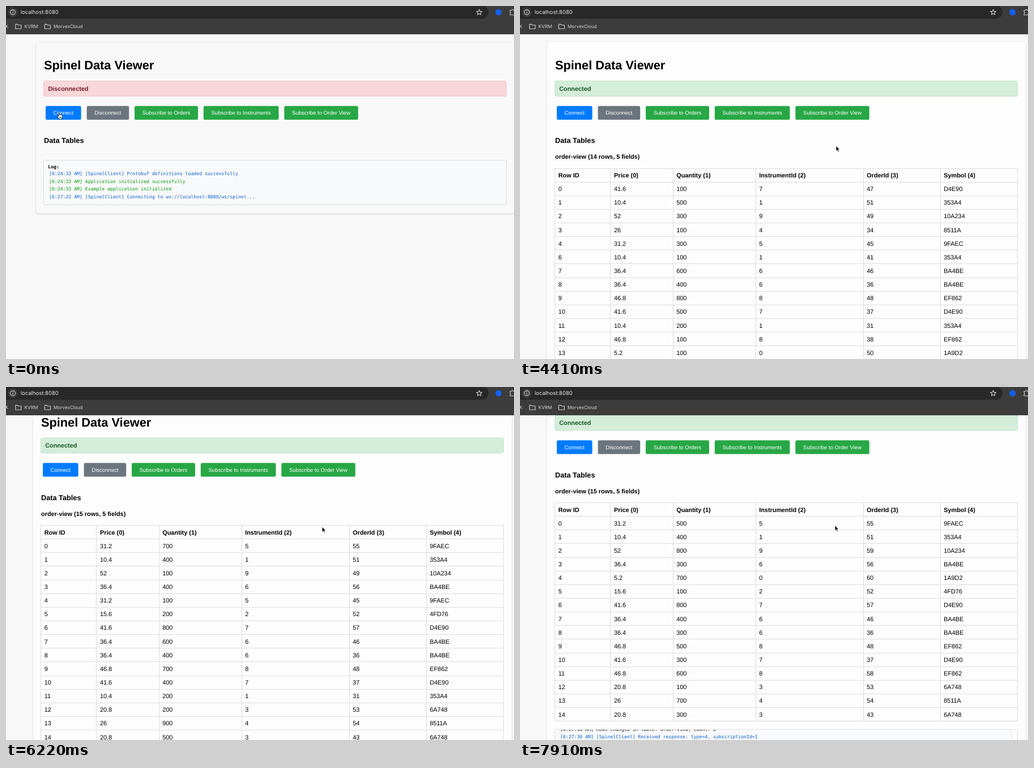
An HTML page for the animation above (8000 ms loop, 897 by 624 pixels).

```html
<!DOCTYPE html>
<html lang="en">
<head>
<meta charset="utf-8">
<title>Spinel Data Viewer</title>
<style>
html, body { margin: 0; width: 100%; height: 100%; overflow: hidden; background: #f8f8f8; }
svg { display: block; }
text { font: 10.88px "Liberation Sans", Arial, sans-serif; text-rendering: geometricPrecision; white-space: pre; }
.h1 { font-size: 21.76px; font-weight: bold; }
.h3 { font-size: 12.73px; font-weight: bold; }
.b { font-weight: bold; }
.btn { font-size: 9.52px; fill: #fff; text-anchor: middle; }
.log, .logb { font: 8.16px "DejaVu Sans Mono", monospace; }
.logb { font-weight: bold; }
.url { font: 9.5px Inter, sans-serif; fill: #e6e6e6; }
.mark { font: 8.16px Inter, sans-serif; fill: #d6d6d6; }
.card { filter: drop-shadow(0 1.2px 1.6px rgba(0, 0, 0, .16)); }
.grid { shape-rendering: crispEdges; fill: none; stroke: #ddd; }
.icon { fill: none; stroke: #d0d0d0; stroke-width: 1.1; stroke-linejoin: round; }
</style>
</head>
<body>
<svg id="stage" width="897" height="624" viewBox="0 0 897 624"></svg>
<script>
const LOOP = 8000;
// bursts of screen updates: first, last, count
const BURSTS = [[0, 0, 1], [180, 1080, 7], [1260, 1560, 3], [1850, 1850, 1], [2330, 2330, 1],
  [2680, 3670, 6], [3820, 4850, 8], [5000, 6040, 8], [6220, 7250, 7], [7430, 7910, 4]];
const TICKS = BURSTS.flatMap(([a, b, n]) =>
  Array.from({ length: n }, (_, i) => n > 1 ? a + (b - a) * i / (n - 1) : a));

const CONNECTED = 480, SUBSCRIBED = 2330, SCHEMA = 2680, TABLE = 3200;
const SCROLL = [[4850, 0], [5446, 12], [6040, 22], [6220, 42.5], [6907, 53.6], [7910, 82.5]];
const POINTER = [[180, 93.5, 188], [1080, 354, 207], [1560, 531, 194], [3000, 531, 194],
  [3670, 558, 247], [6220, 558, 247], [6907, 558, 246], [7250, 558, 246], [7910, 556, 244.5]];

const BUTTONS = [
  ['Connect', 70, 62.6, '#007bff'], ['Disconnect', 142.6, 74.6, '#6c757d'],
  ['Subscribe to Orders', 227, 112, '#28a745'], ['Subscribe to Instruments', 348.8, 132.7, '#28a745'],
  ['Subscribe to Order View', 491.3, 130.5, '#28a745']];

const BLUE = '#0a60cf', GREEN = '#0a990a', CLIENT = '[SpinelClient] ';
const LOG = [
  ['6:24:33', CLIENT + 'Protobuf definitions loaded successfully', BLUE],
  ['6:24:33', 'Application initialized successfully', GREEN],
  ['6:24:33', 'Example application initialized', GREEN],
  ['6:27:22', CLIENT + 'Connecting to ws://localhost:8080/ws/spinel...', BLUE],
  ['6:27:23', CLIENT + 'WebSocket connected', BLUE],
  ['6:27:23', 'Connected to Spinel server', GREEN],
  ['6:27:24', CLIENT + 'Subscription request sent for table: order-view (subscriptionId: 1)', BLUE],
  ['6:27:24', 'Subscribed to table: order-view', BLUE],
  ['6:27:25', CLIENT + 'Received response: type=1, subscriptionId=1', BLUE],
  ['6:27:25', CLIENT + 'Schema update for subscription 1, table: Filter-00000000', BLUE],
  ['6:27:25', 'Schema updated for table: order-view', BLUE]];
const LATE_LOG = [
  ['6:27:30', 'Rows changed in table: order-view, count: 2', '#222'],
  ['6:27:30', CLIENT + 'Received response: type=4, subscriptionId=1', BLUE]];

const COLS = [66.5, 164.8, 275, 421, 611, 747, 883.5], ROW_H = 24.14, TABLE_Y = 287;
const HEAD = ['Row ID', 'Price (0)', 'Quantity (1)', 'InstrumentId (2)', 'OrderId (3)', 'Symbol (4)'];
const SYMBOLS = '1A9D2 353A4 4FD76 6A748 8511A 9FAEC BA4BE D4E90 EF862 10A234'.split(' ');
// rows: "quantity instrument order"; row 5 arrives later
const ROWS = ['100 7 47', '500 1 51', '300 9 49', '100 4 34', '300 5 45', '', '100 1 41', '600 6 46',
  '400 6 36', '800 8 48', '500 7 37', '200 1 31', '100 8 38', '100 0 50', '500 3 43'];
// time, then row:values; a lone quantity keeps the rest of the row
const UPDATES = [
  [4540, '5:200 2 52'], [4840, '12:200 3 53', '10:400'], [5140, '13:900 4 54', '9:700'], [5290, '0:700 5 55'],
  [5590, '3:400 6 56', '1:400'], [5880, '2:100', '4:100'], [6030, '6:800 7 57'],
  [6380, '5:100', '7:400'], [6560, '11:600 8 58', '8:300'], [6730, '10:300', '14:300'],
  [7070, '0:500', '2:800 9 59'], [7420, '3:300', '9:500'], [7580, '4:700 0 60'], [7740, '12:100', '13:700']];

const text = (x, y, s, cls = '', fill = '#000') => `<text x="${x}" y="${y}" class="${cls}" fill="${fill}">${s}</text>`;
const rect = (x, y, w, h, fill, r = 0, more = '') =>
  `<rect x="${x}" y="${y}" width="${w}" height="${h}" rx="${r}" fill="${fill}" ${more}/>`;

function along(keys, t, k = 1) {
  const i = keys.findIndex(p => p[0] > t);
  if (i === 0) return keys[0][k];
  if (i < 0) return keys[keys.length - 1][k];
  const a = keys[i - 1], b = keys[i];
  return a[k] + (b[k] - a[k]) * (t - a[0]) / (b[0] - a[0]);
}

function rowsAt(t) {
  const rows = ROWS.map(r => r ? r.split(' ') : null);
  for (const [at, ...changes] of UPDATES) if (at <= t)
    for (const c of changes) {
      const [id, values] = c.split(':'), v = values.split(' ');
      rows[id] = v.length > 1 ? v : [v[0], ...rows[id].slice(1)];
    }
  return rows.map((r, id) => r && [id, +(5.2 * (+r[1] + 1)).toFixed(1), ...r, SYMBOLS[r[1]]]).filter(Boolean);
}

function table(rows) {
  const bottom = TABLE_Y + ROW_H * (rows.length + 1);
  let d = COLS.map(x => `M${x} ${TABLE_Y}V${bottom}`).join('');
  for (let i = 0; i <= rows.length + 1; i++) d += `M66 ${TABLE_Y + ROW_H * i}H884`;
  const cells = [HEAD, ...rows].map((r, i) => r.map((c, j) =>
    text(COLS[j] + 6.2, TABLE_Y + 16 + ROW_H * i, c, i ? '' : 'b')).join('')).join('');
  return `<path class="grid" d="${d}"/>` + cells;
}

const logLine = ([time, msg, fill], y) => text(76, y, `[${time} AM] ${msg}`, 'log', fill);
const logBox = (y, h) => rect(66.5, y + .5, 817, h, '#f8f9fa', 2.7, 'stroke="#ddd"');

function page(t) {
  const open = t >= TABLE, on = t >= CONNECTED, schema = t >= SCHEMA;
  const lines = schema ? 11 : t >= SUBSCRIBED ? 8 : on ? 6 : 4;
  const logY = schema ? 324 : 272, logH = 25.6 + lines * 13.6;
  const cardH = open ? 800 : logY + logH + 14.5 - 64;
  const rows = open ? rowsAt(t) : [];
  let s = rect(53, 64, 845, cardH, open ? '#fdfdfd' : on ? '#fbfbfb' : '#f8f8f8', 5.4, 'class="card"');
  s += text(67, 112, 'Spinel Data Viewer', 'h1');
  s += rect(66.5, 132.5, 817, 27, on ? '#d4edda' : '#f8d7da', 2.7, `stroke="${on ? '#c3e6cb' : '#f5c6cb'}"`);
  s += text(74.2, 149.6, on ? 'Connected' : 'Disconnected', 'b', on ? '#155724' : '#721c24');
  for (const [label, x, w, fill] of BUTTONS)
    s += rect(x, 176.7, w, 24.4, fill, 2.7) + text(x + w / 2, 192.1, label, 'btn');
  s += text(67, 242.3, 'Data Tables', 'h3');
  if (schema) s += text(67, 270, `order-view (${rows.length} rows, 5 fields)`, 'b');
  if (open) {
    const y = TABLE_Y + ROW_H * (rows.length + 1) + 14;
    s += table(rows) + logBox(y, 136) + rect(873, y + 1, 10, 135, '#fbfbfb') + rect(873, y + 1, 1, 135, '#e8e8e8');
    s += `<clipPath id="logClip"><rect x="67" y="${y + 1}" width="806" height="135"/></clipPath><g clip-path="url(#logClip)">`;
    s += LATE_LOG.map((l, i) => logLine(l, y + 3 + 13.6 * i)).join('') + '</g>';
  } else {
    if (schema) s += text(67, 296.8, 'No data available');
    s += logBox(logY, logH - 1) + text(74.3, logY + 15, 'Log:', 'logb');
    s += LOG.slice(0, lines).map((l, i) => logLine(l, logY + 27 + 13.6 * i)).join('');
  }
  return `<g transform="translate(${open ? -5 : 0} ${-along(SCROLL, t)})">${s}</g>`;
}

function chrome() {
  const folder = x => `<path class="icon" d="M${x} 32.4h3.6l1.3 1.4h5.1v6.4h-10z"/>`;
  const star = Array.from({ length: 10 }, (_, i) => {
    const r = i % 2 ? 2.3 : 5.2, a = i * Math.PI / 5;
    return `${835.6 + r * Math.sin(a)},${11.2 - r * Math.cos(a)}`;
  }).join(' ');
  return rect(0, 0, 897, 50, '#3c3c3c') + rect(-20, -1, 872, 23.4, '#282828', 11.7) +
    '<circle cx="12" cy="11" r="8.6" fill="#3c3c3c"/><circle cx="12" cy="11" r="4.4" class="icon"/>' +
    '<path class="icon" d="M12 10.4v3M12 8.3v1"/>' +
    text(25.7, 14.3, 'localhost:8080', 'url') +
    text(-1.5, 38.8, 'X', 'mark') + folder(16.8) + text(32.6, 38.8, 'KVRM', 'mark') +
    folder(68.4) + text(84, 38.8, 'MorvexCloud', 'mark') +
    `<polygon class="icon" points="${star}"/><circle cx="869.6" cy="11" r="5.5" fill="#1560f0"/>` +
    '<path class="icon" d="M890 7.5h2.6a1.5 1.5 0 0 1 3 0h3v8.3h-8.6v-2.6a1.6 1.6 0 0 0 0-3.1z"/>';
}

function pointer(t) {
  const x = along(POINTER, t, 1), y = along(POINTER, t, 2);
  const hover = y > 176 && y < 201 && BUTTONS.some(b => x > b[1] && x < b[1] + b[2]);
  const shape = hover
    ? `<path fill="#fff" stroke="#111" stroke-width=".9" stroke-linejoin="round" d="M-1 1Q0-.4 1 1V4.6Q2 3.8 2.9 4.8Q4 4.2 4.7 5.2Q6.3 4.8 6.4 6.4Q6.5 8.8 5.3 10.2V12H.4Q-.6 10.2-2.6 7.6Q-3.2 6.2-1.8 6.2L-.7 7.2Z"/><path stroke="#111" stroke-width=".7" d="M1.3 7.6v2.5M2.8 7.6v2.5M4.2 7.6v2.5"/>`
    : '<path fill="#000" stroke="#fff" stroke-width=".9" stroke-linejoin="round" d="M0 0V9.6L2.2 7.6L3.7 11.2L5.4 10.5L3.9 7H6.8Z"/>';
  return `<g transform="translate(${x} ${y})">${shape}</g>`;
}

const stage = document.getElementById('stage'), bar = chrome();
let shown = -1;
function frame(now) {
  const t = now % LOOP, tick = TICKS.filter(k => k <= t).pop();
  if (tick !== shown) {
    shown = tick;
    stage.innerHTML = page(tick) + bar + pointer(tick);
  }
  requestAnimationFrame(frame);
}
frame(0);
</script>
</body>
</html>
```
